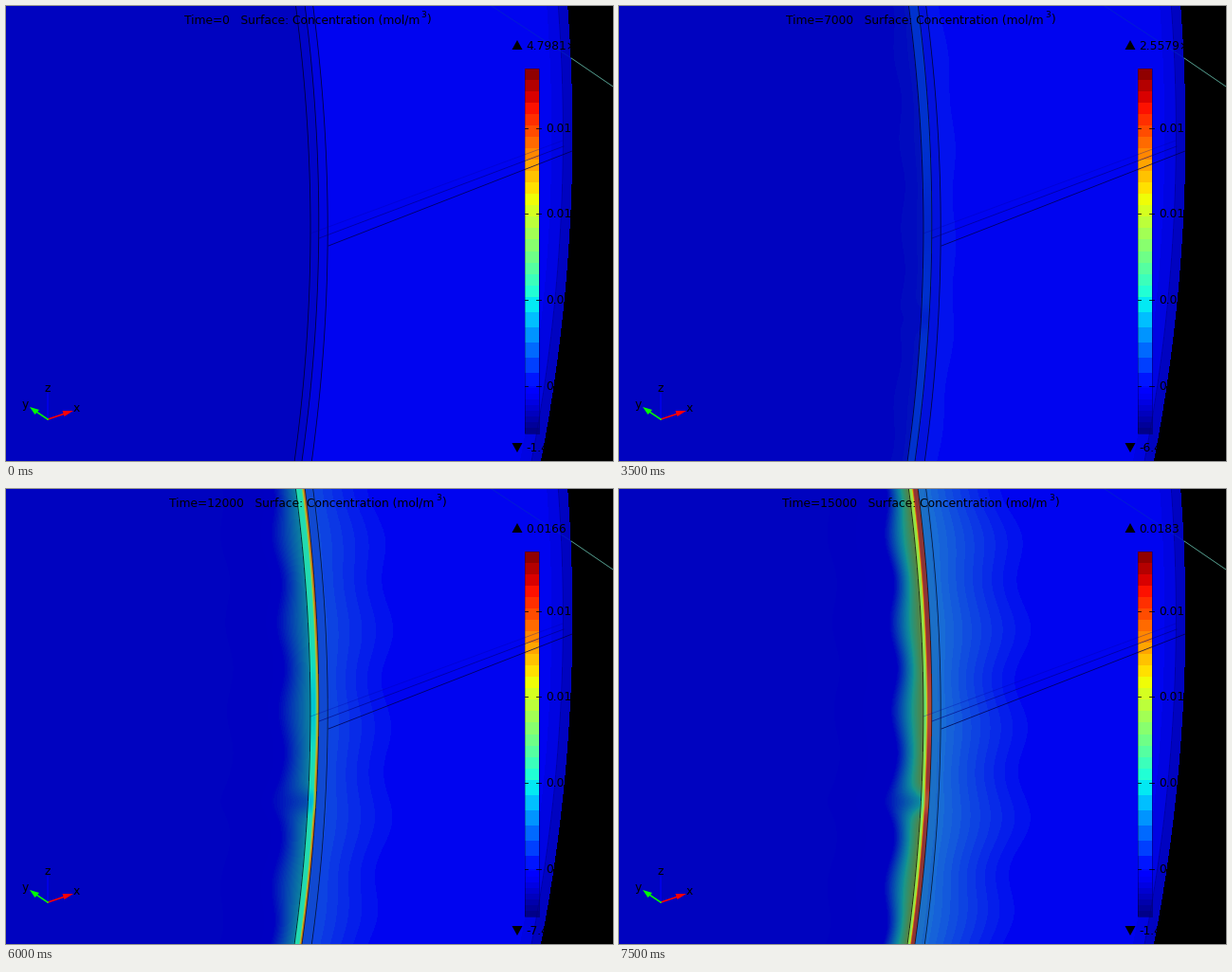
These frames come from a looping animation (640x480 px, 8 s). A matplotlib script:

```python
import numpy as np
import matplotlib.pyplot as plt
from matplotlib import colormaps
from matplotlib.animation import FuncAnimation
from matplotlib.patches import Polygon, Rectangle

W, H, DPI = 640, 480, 80
STEPS, INTERVAL = 16, 500
PT = 72 / DPI
ZERO = 0.13  # colormap position of zero concentration

plt.rcParams["font.family"] = "DejaVu Sans"
jet = colormaps["jet"].resampled(1024)

fig = plt.figure(figsize=(W / DPI, H / DPI), dpi=DPI, facecolor="black")
ax = fig.add_axes([0, 0, 1, 1])
ax.set_axis_off()

X, Y = np.meshgrid(np.arange(W) + 0.5, np.arange(H) + 0.5)


def arc(peak, mid, y):
    return peak - 2.8e-4 * (y - mid) ** 2


def edge_a(y):
    return arc(321, 235, y)


def edge_b(y):
    return arc(329.8, 228, y)


def edge_c(y):
    return arc(339.2, 235, y)


def rim(y):
    return arc(597.3, 135, y)


def wave(mid, period):
    return np.cos(2 * np.pi * (Y - mid) / period)


def bump(mid, width):
    return np.exp(-((Y - mid) / width) ** 2)


def smooth(t):
    t = np.clip(t, 0, 1)
    return t * t * (3 - 2 * t)


A, B, C, RIM = (f(Y) for f in (edge_a, edge_b, edge_c, rim))
LEFT, STRIP = X < A, (X >= A) & (X < B)
ACROSS = np.clip((X - A) / (B - A), 0, 1)

# Uneven reach and strength of the diffusion along the membrane
notch = bump(330, 14)
left_w = 27 + 3.5 * wave(52, 91) + 4 * np.sin(np.pi * Y / H) + 5 * notch
left_amp = 1 - 0.45 * notch
right_w = 1 + 0.07 * wave(150, 100) + 0.04 * wave(340, 230)
strip_dip = 0.2 * bump(230, 50) + 0.25 * notch

SHADE = np.select(
    [LEFT, STRIP, X < C, X < RIM - 22, X < RIM - 10],
    [0.755, 0.79, 0.88, 0.945, 0.89], 0.76)
VEIL = np.array([0.5, 0.42, 0.42])


def banded(v, step):
    return np.round(v / step) * step


def paint(k):
    p = np.clip((k - 5) / 10, 0, 1)

    gap = A - X
    glow = 0.4 * p ** 2 * left_amp * np.clip(1 - gap / left_w, 0, 1) ** 1.2
    beyond = gap - left_w
    under = np.where(beyond > 0, np.clip(1 - beyond / 75, 0, 1), 0)
    glow = banded(glow - 0.02 * p * under, 0.008)

    # The steep front starts at the right wall and moves inward
    front = smooth((ACROSS - 0.85 + 0.6 * p ** 2) / 0.35)
    low, high = 0.42 * p ** 1.25, 0.83 * smooth(p)
    strip = (low + (high - low) * front) * (1 - strip_dip * (1.6 - p))

    span = (35 + 75 * p) * right_w
    tail = 0.125 * p ** 1.3 * np.clip(1 - (X - B) / span, 0, 1) ** 1.4
    tail = banded(tail, 0.012)

    v = np.select([LEFT, STRIP], [glow, strip], tail)
    shade = SHADE + np.select([LEFT, STRIP], [-0.55 * v, 0.1 * p], 0)
    mix = np.select([LEFT, STRIP], [0.5 * v, 0.5 * p * front], 1.8 * v)
    shade, mix = shade[..., None], np.clip(mix, 0, 0.6)[..., None]
    rgb = jet(np.clip(ZERO + v, 0, 1))[..., :3] * shade
    rgb = rgb * (1 - mix) + VEIL * mix
    rgb[X > RIM] = 0
    rgb[66:451, 547:562] = bar
    return np.clip(rgb, 0, 1)


def colorbar():
    u = (451 - np.arange(66, 451) - 0.5) / 385
    size = np.where(u < 0.13, 1 / 64, np.where(u < 0.38, 1 / 24, 1 / 32))
    u = (np.floor(u / size) + 0.5) * size
    return jet(np.clip(u, 0, 1))[:, None, :3]


bar = colorbar()
picture = ax.imshow(paint(0), extent=(0, W, H, 0), aspect="auto",
                    interpolation="nearest")
ax.set_xlim(0, W)
ax.set_ylim(H, 0)


def line(x, y, color="black", width=0.8, alpha=1):
    ax.plot(x, y, color=color, lw=width * PT, alpha=alpha)


def label(x, y, s="", size=12.3, ha="left"):
    return ax.text(x, y, s, fontsize=size * PT, ha=ha, va="baseline")


def shape(points, color):
    ax.add_patch(Polygon(points, fc=color, ec="none"))


# Model edges
ys = np.linspace(0, H, 60)
for edge in (edge_a, edge_b, edge_c):
    line(edge(ys), ys, alpha=0.75)
line(rim(ys) - 10, ys, "#000078", 0.8, 0.5)
line([321, 587], [240, 142], "#0000a0", 0.8, 0.35)
line([330, 588], [245, 148], "#000078", 0.8, 0.65)
line([340, 597], [253, 153], "#000046", 0.8, 0.85)
line([512, 596], [0, 55], "#0030c0", 0.8, 0.6)
line([596, 640], [55, 85], "#5aa898", 0.8)

# Colour legend
ax.add_patch(Rectangle((547, 66), 15, 385, fill=False, ec="black",
                       lw=0.6 * PT, alpha=0.5))
for y, s in ((128.5, "0.015"), (218.5, "0.01"), (309.5, "0.005"), (400.5, "0")):
    line([547, 550], [y, y])
    line([559, 564], [y, y])
    label(569.5, y + 4.5, s)
shape([(533.5, 46), (544.5, 46), (539, 36)], "black")
shape([(533.5, 461), (544.5, 461), (539, 471)], "black")

# Axis triad
line([44, 44], [436, 409], "#0000f0", 1.5)
line([44, 62], [436, 430], "red", 1.6)
line([44, 32], [436, 428], "lime", 1.6)
shape([(59.5, 427), (61.5, 433), (71, 427)], "red")
shape([(25, 423), (35, 426), (30.5, 431)], "lime")
label(74, 428, "x", ha="center")
label(20.5, 424, "y", ha="center")
label(44, 407, "z", ha="center")

title = label(188, 18)
power = label(437, 12.5, "3", 9)
close = label(443.5, 18, ")")
top = label(548, 45.5)
bottom = label(548, 470.5)

HIGH = ("4.7981×10 1.2046×10 3.3518×10 6.0157×10 9.1264×10 3.8402×10 "
        "1.0935×10 2.5579×10 4.9326×10 8.081×10 0.0117 0.0148 0.0166 "
        "0.0178 0.0181 0.0183").split()
LOW = "1123472612457911"


def update(k):
    picture.set_data(paint(k))
    time = str(k * 1000)
    shift = 4 * (len(time) - 1)
    title.set_text(f"Time={time}   Surface: Concentration (mol/m")
    title.set_x(188 - shift)
    power.set_x(437 + shift)
    close.set_x(443.5 + shift)
    top.set_text(HIGH[k])
    bottom.set_text(f"-{LOW[k]}.4×10")
    return picture, title, power, close, top, bottom


anim = FuncAnimation(fig, update, frames=STEPS, interval=INTERVAL,
                     repeat=True, repeat_delay=0, blit=False)
plt.show()
```
